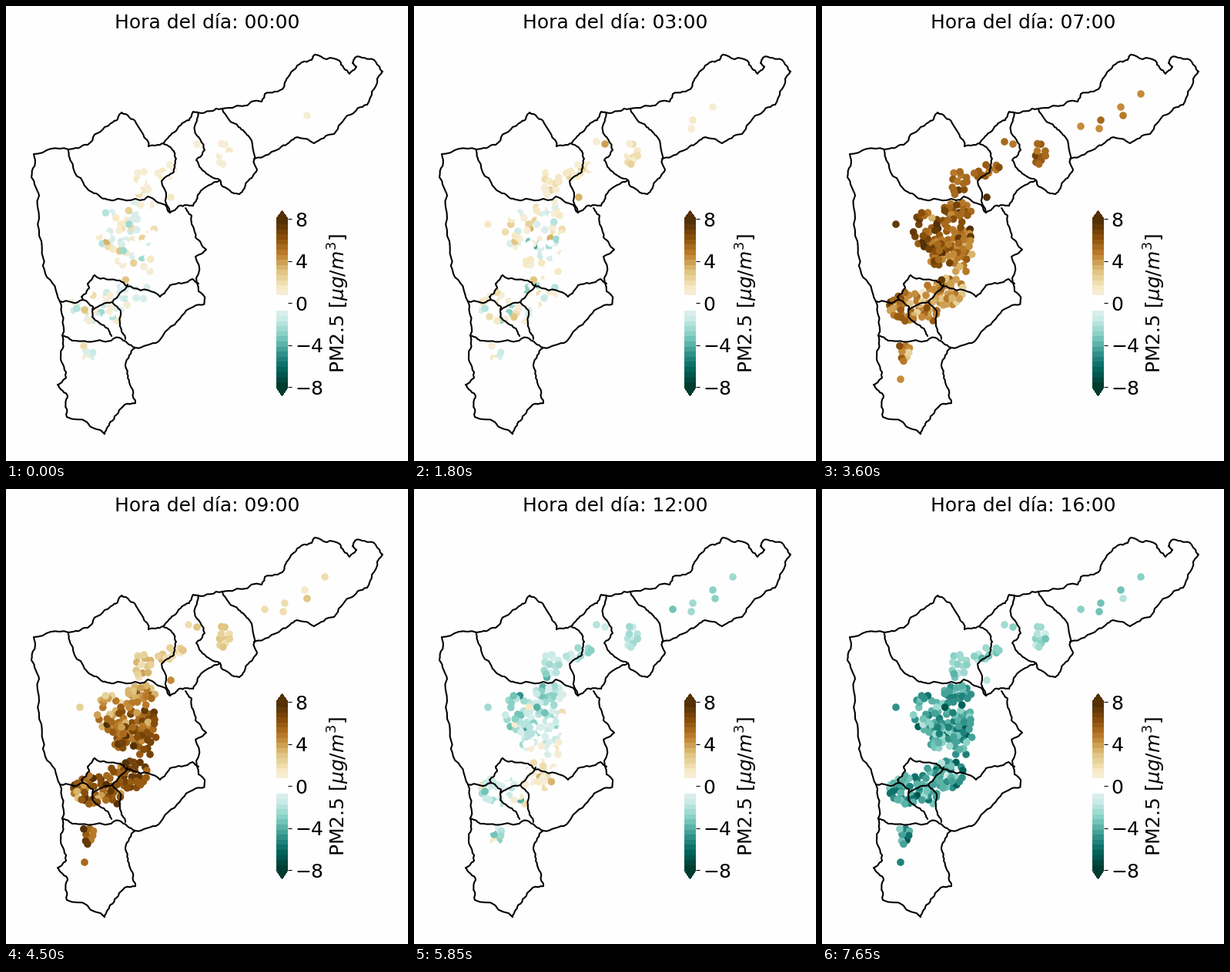
A matplotlib script that plays this animation: 522x590 px, repeating every 8000 ms.

```python
import numpy as np
import matplotlib.pyplot as plt
from matplotlib.animation import FuncAnimation
from matplotlib.cm import ScalarMappable
from matplotlib.collections import LineCollection
from matplotlib.colors import ListedColormap, Normalize

W, H, DPI = 522, 590, 100
STEP_MS, LOOP_MS, HOUR_MS = 50, 8000, 450
HOURS = 17
FONT = 18
rng = np.random.default_rng(7)
plt.rcParams["font.family"] = "DejaVu Sans"

# Corner points of the municipal borders; every shared edge appears once.
BORDERS = [
    "281,133 332,124 336,114 361,105 364,95 384,73 397,70 401,63 433,71 446,88 455,79 450,74 "
    "453,67 478,70 489,85 482,94 469,128 447,141 426,166 400,178 375,171 358,182 322,198",
    "249,138 281,133 302,157 316,170 326,212 313,228 303,244 279,231 278,226",
    "249,138 245,161 258,187 247,200 255,213 278,226",
    "204,178 218,164 238,148 243,137 249,138",
    "278,226 251,243 243,259 225,259 213,268",
    "204,178 218,188 221,198 218,215 202,227 213,268",
    "81,186 106,180 128,157 145,147 150,138 169,152 185,182 204,178",
    "81,186 82,195 102,233 122,247 140,252 184,247 207,258 213,268",
    "81,186 36,192 33,222 43,246 46,305 51,347 70,383",
    "233,262 241,272 246,300 260,316 246,325 250,370 258,377 257,387 232,398 204,427 198,435 168,443",
    "250,360 242,354 213,362 200,377 166,366 148,356 115,349 106,360 108,366 98,377 100,381 70,383",
    "158,361 138,384 113,394",
    "100,381 113,390 112,403 132,418 137,428",
    "138,384 149,398 150,420 155,432",
    "70,383 73,427 86,434 118,434 147,430 168,443",
    "73,427 71,455 78,482 67,491 80,507 79,533 128,555 138,538 154,517 168,515 160,488 155,465 168,443",
]

# Sensor clusters: centre, radii and number of sites.
CLUSTERS = [
    (284, 192, 10, 17, 10),
    (215, 214, 22, 9, 11),
    (178, 230, 11, 18, 13),
    (178, 264, 20, 10, 18),
    (135, 290, 17, 24, 22),
    (168, 295, 28, 22, 34),
    (150, 320, 16, 16, 18),
    (180, 318, 17, 30, 22),
    (165, 370, 21, 18, 30),
    (140, 385, 18, 24, 16),
    (112, 390, 25, 19, 34),
    (107, 447, 8, 14, 8),
]
ISOLATED = "414,114 388,131 391,142 362,148 360,159 336,156 237,176 248,179 214,248 96,283 102,484"


def points(text):
    return np.array([p.split(",") for p in text.split()], float)


def roughen(line, levels=3, amount=0.1):
    """Midpoint displacement gives the borders their ragged edge."""
    for _ in range(levels):
        step = np.diff(line, axis=0)
        normal = step[:, ::-1] * [-1, 1]
        shift = rng.uniform(-amount, amount, (len(step), 1))
        out = np.empty((2 * len(line) - 1, 2))
        out[::2] = line
        out[1::2] = line[:-1] + step / 2 + normal * shift
        line = out
        amount *= 1.3
    return line


def place_sensors(gap=4):
    """Fill each cluster's ellipse at random, keeping sites slightly apart."""
    sites = list(points(ISOLATED))
    for cx, cy, rx, ry, count in CLUSTERS:
        goal = len(sites) + count
        for angle, r in rng.random((500, 2)) * [2 * np.pi, 1]:
            if len(sites) == goal:
                break
            radius = np.sqrt(r)
            site = np.array([cx + rx * radius * np.cos(angle), cy + ry * radius * np.sin(angle)])
            if np.hypot(*(np.array(sites) - site).T).min() > gap:
                sites.append(site)
    return np.array(sites)


def smoothstep(t):
    t = np.clip(t, 0, 1)
    return t * t * (3 - 2 * t)


def anomaly(hour):
    """A morning peak, later towards the south-east, then an afternoon low."""
    southness = np.clip((y - 230) / 140, 0, 1)
    core = np.clip((y - 230) / 40, 0, 1)
    peak = 6.6 + 2 * southness + 0.012 * (x - 140) * (y > 250)
    morning = (4.6 + 1.8 * core) * np.exp(-((hour - peak) / 2.6) ** 2)
    afternoon = (3.4 + core) * smoothstep((hour - peak - 1.7) / 5)
    base = 0.8 * ((y < 250) & (x < 300))
    spread = 0.5 + 0.4 * core
    return base + morning - afternoon + spread * (0.7 * site_noise + 0.6 * hour_noise[hour])


borders = [roughen(points(b)) for b in BORDERS]
sites = place_sensors()
x, y = sites.T
site_noise = rng.laplace(size=len(x))
hour_noise = rng.laplace(size=(HOURS, len(x)))

# Brown-to-teal steps with a white middle.
shades = plt.get_cmap("BrBG_r")(np.linspace(0, 1, 33))
shades[15:18] = 1
cmap, norm = ListedColormap(shades), Normalize(-8, 8)

fig = plt.figure(figsize=(W / DPI, H / DPI), dpi=DPI, facecolor="#fefefe")
ax = fig.add_axes([0, 0, 1, 1])
ax.set(xlim=(0, W), ylim=(H, 0))
ax.axis("off")
dots = ax.scatter(x, y, c=anomaly(0), s=48, cmap=cmap, norm=norm, linewidths=0, zorder=2)
ax.add_collection(LineCollection(borders, colors="black", linewidths=1.5,
                                 joinstyle="round", capstyle="round", zorder=3))
title = ax.text(261, 29, "", fontsize=FONT, ha="center", va="baseline")
ax.text(441, 385, r"PM2.5 [$\mu g/m^3$]", fontsize=FONT, rotation=90,
        rotation_mode="anchor", ha="center", va="baseline")

cax = fig.add_axes([351 / W, 84.6 / H, 15 / W, 240 / H])
bar = fig.colorbar(ScalarMappable(norm, cmap), cax=cax, extend="both", ticks=range(-8, 9, 4))
bar.ax.tick_params(labelsize=FONT)
bar.outline.set_visible(False)


def update(frame):
    hour = max(0, frame * STEP_MS // HOUR_MS - 1)
    dots.set_array(anomaly(hour))
    title.set_text(f"Hora del día: {hour:02d}:00")
    return dots, title


anim = FuncAnimation(fig, update, frames=LOOP_MS // STEP_MS, interval=STEP_MS,
                     repeat=True, repeat_delay=0)
plt.show()
```
